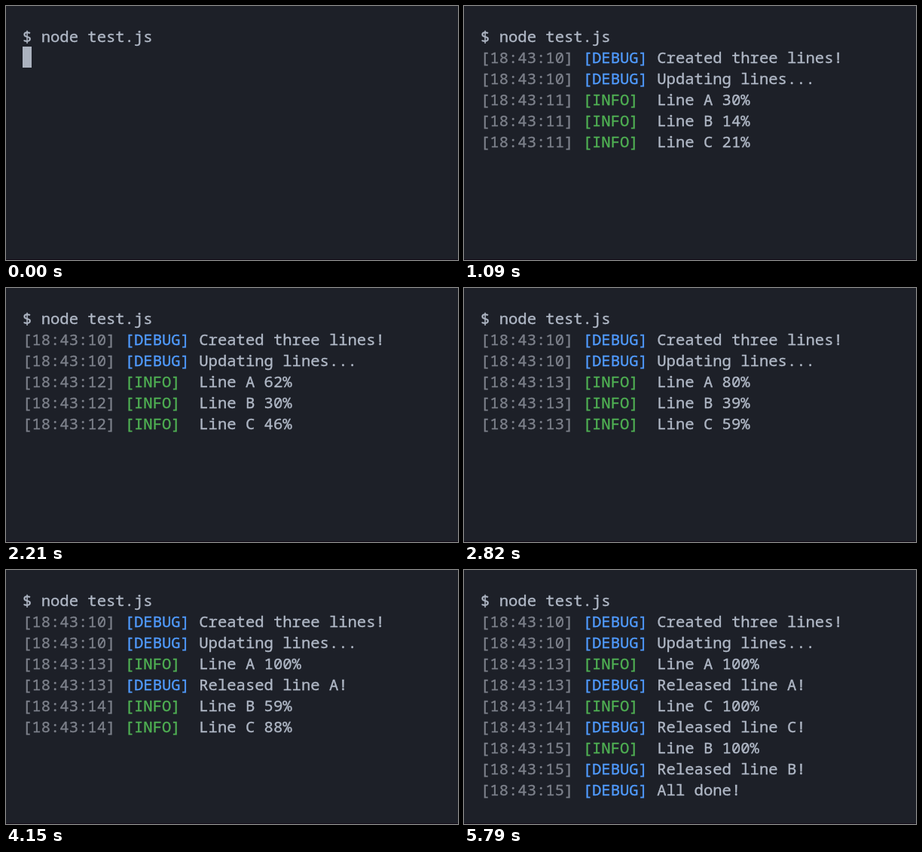
Recreate the animation shown at these times as an HTML page. Size 600x338 px, loop 5.82 s.

```html
<!DOCTYPE html>
<html lang="en">
<head>
<meta charset="utf-8">
<title>Terminal progress lines</title>
<style>
  html, body { margin: 0; width: 100%; height: 100%; overflow: hidden; background: #1d2028; }
  #screen {
    position: absolute; left: 0; top: 0; width: 600px; height: 338px;
    box-sizing: border-box; margin: 0; padding: 26px 0 0 22px; overflow: hidden;
    border-bottom: 1px solid #120b17;
    color: #b0b8c6; font: 20.55px/28px "Noto Sans Mono", "DejaVu Sans Mono", monospace;
    font-variant-ligatures: none; -webkit-text-stroke: 0.35px;
  }
  .time { color: #7d818b; }
  .debug { color: #509bff; }
  .info { color: #4fb053; }
  .cursor { display: inline-block; width: 12px; height: 28px; background: #abb2bf; vertical-align: top; }
</style>
</head>
<body>
<pre id="screen"></pre>
<script>
const LOOP = 5820, START = 30;
const RUSH = 4690, SPEEDUP = 3.3; // the last open line hurries from RUSH on
const screen = document.getElementById("screen");

// Each line gains one percent per step (ms).
const bars = [
  { name: "A", start: 48, step: 34.6 },
  { name: "B", start: 80, step: 69 },
  { name: "C", start: 80, step: 46.1 },
];
for (const bar of bars) {
  const full = bar.start + 100 * bar.step;
  bar.end = Math.min(full, RUSH + (full - RUSH) / SPEEDUP);
}

function percent({ start, step, end }, t) {
  if (t >= end) return 100;
  const work = Math.max(t, RUSH + (t - RUSH) * SPEEDUP);
  return Math.max(0, Math.floor((work - start) / step));
}

function log(level, text, t) {
  const second = 11 + Math.floor((t - 745) / 1000);
  const tag = `[${level}]`;
  return `<span class="time">[18:43:${second}]</span> ` +
    `<span class="${level.toLowerCase()}">${tag}</span>${" ".repeat(8 - tag.length)}${text}`;
}

function render(t) {
  const rows = ["$ node test.js"];
  if (t < START) return rows[0] + '\n<span class="cursor"></span>';

  rows.push(log("DEBUG", "Created three lines!", START), log("DEBUG", "Updating lines...", START));
  const progress = (bar, at) => log("INFO", `Line ${bar.name} ${percent(bar, at)}%`, at);
  const done = bars.filter(bar => bar.end <= t).sort((a, b) => a.end - b.end);
  for (const bar of done) {
    rows.push(progress(bar, bar.end), log("DEBUG", `Released line ${bar.name}!`, bar.end));
  }
  for (const bar of bars) if (bar.end > t) rows.push(progress(bar, t));
  if (done.length === bars.length) rows.push(log("DEBUG", "All done!", done.at(-1).end));
  return rows.join("\n");
}

let shown = "";
const origin = performance.now();
function frame() {
  const html = render((performance.now() - origin) % LOOP);
  if (html !== shown) screen.innerHTML = shown = html;
  requestAnimationFrame(frame);
}
frame();
</script>
</body>
</html>
```
